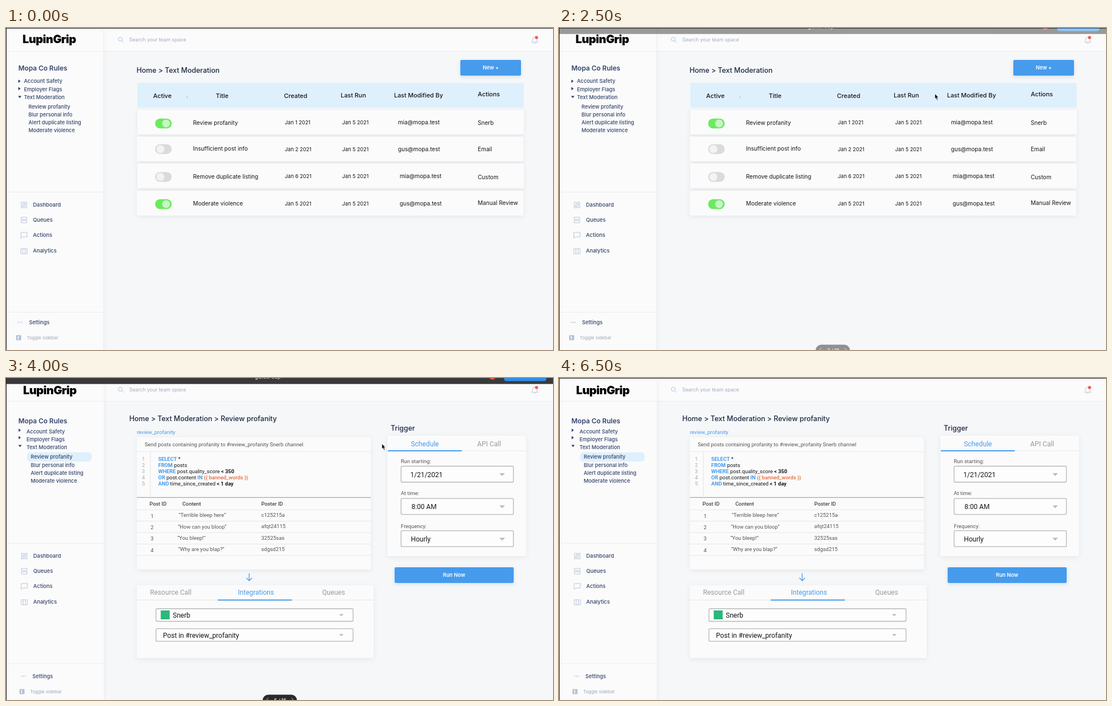
Recreate the animation shown at these times as an HTML page. Size 974 px wide and 575 px high, loop 6750 ms.

```html
<!DOCTYPE html>
<html lang="en">
<head>
<meta charset="utf-8">
<title>Rules console</title>
<style>
html, body { margin: 0; width: 100%; height: 100%; overflow: hidden; background: #f5f7f9; }
svg { display: block; width: 974px; height: 575px; }
text { font-family: Inter, sans-serif; white-space: pre; }
.r { font-family: Roboto, sans-serif; }
.card { fill: #fbfbfb; filter: drop-shadow(0 2px 4px rgba(40, 50, 70, .08)); }
.btn { fill: #469bec; filter: drop-shadow(0 2px 3px rgba(40, 90, 150, .16)); }
.icon { fill: none; stroke: #b9c5d8; stroke-width: 1; }
</style>
</head>
<body>
<svg id="stage" viewBox="0 0 974 575"></svg>
<script>
const NAVY = '#33446b', INK = '#15161a', BLUE = '#469bec', GREY = '#555';
const BRAND = 'LupinGrip', APP = 'Snerb';

// y is the middle of the line
const text = (x, y, s, size, fill = INK, weight = 400, cls = '') =>
  `<text x="${x}" y="${y + size * .36}" font-size="${size}" fill="${fill}" font-weight="${weight}" class="${cls}">${s}</text>`;
const roboto = (x, y, s, size = 9.45, fill = GREY, weight = 400) => text(x, y, s, size, fill, weight, 'r');
const rect = (x, y, w, h, fill, r = 0, more = '') =>
  `<rect x="${x}" y="${y}" width="${w}" height="${h}" rx="${r}" fill="${fill}" ${more}/>`;
const card = (x, y, w, h) => `<rect class="card" x="${x}" y="${y}" width="${w}" height="${h}" rx="1"/>`;
const path = (d, more = '') => `<path d="${d}" ${more}/>`;
const circle = (x, y, r, fill) => `<circle cx="${x}" cy="${y}" r="${r}" fill="${fill}"/>`;
const shift = (x, y, s) => `<g transform="translate(${x} ${y})">${s}</g>`;
const each = (list, fn) => list.map(fn).join('');
const button = (x, y, w, label, lx) =>
  `<rect class="btn" x="${x}" y="${y}" width="${w}" height="28" rx="2"/>` + text(lx, y + 13.7, label, 9.2, '#fff', 600);
const select = (x, y, w, h, value, vx, tx, half) =>
  rect(x, y, w, h, '#fdfdfd', 2, 'stroke="#b6b6b6" stroke-width="1.3"') +
  roboto(vx, y + h / 2 + .4, value, 12.1, INK) +
  path(`M${tx - half} ${y + h / 2 - 1.8}h${half * 2}l${-half} ${half}z`, 'fill="#bcbcbc"');

function sidebar(titleY, x, y, subX, arrowX, arrowY, editing) {
  const d = editing ? 2 : 0;
  const rule = y => rect(1, y, 172 + d / 2, 1, '#ececef');
  const nav = [['Dashboard', 315.5], ['Queues', 342.5], ['Actions', 369.7], ['Analytics', 398]];
  return `<rect class="card" x="1" y="1" width="${172 + d / 2}" height="574"/>` +
    rule(41) + rule(292.5 + d) + rule(507 + d * 1.3) +
    `<g letter-spacing="-.5">${text(29.5 + d / 2, 20.2 + d, BRAND, 20.2, '#000', 900)}</g>` +
    text(22, titleY, 'Mopa Co Rules', 12, NAVY, 600) +
    (editing ? rect(subX - 6.5, y + 37, 115, 16.5, '#def0fc', 6) : '') +
    each(['Account Safety', 'Employer Flags', 'Text Moderation'], (s, i) => text(x, y + i * 14.2, s, 9.3, NAVY, 500)) +
    each(['Review profanity', 'Blur personal info', 'Alert duplicate listing', 'Moderate violence'],
      (s, i) => text(subX, y + 45.3 + i * 14.2, s, 9.3, NAVY, 500)) +
    path(`M${arrowX} ${arrowY - 3}v6l4-3zm0 13.3v6l4-3zM${arrowX - .5} ${arrowY + 26.3}h6l-3 4z`, `fill="${NAVY}"`) +
    shift(d / 4, d, each(nav, ([s, y]) => text(48, y, s, 9.5, NAVY, 500)) +
      path('M27 311h4v5h-4zM33 311h4v3h-4zM33 316h4v5h-4zM27 318h4v3h-4z' +
        'M27 338h10v4h-10zM27 344h10v4h-10z' +
        'M26.500 365h11v8h-8l-3 2.500z' +
        'M26.500 394h11v9h-11zM30 394v9M34 394v9', 'class="icon"')) +
    shift(d * 3, d * 3.5, each([22, 25.3, 28.6], x => circle(x, 525.5, .9, '#b3bccb')) +
      text(41, 525.3, 'Settings', 9.3, NAVY, 500) +
      rect(18, 548.5, 9, 9, '#b4c1d6', 1) + rect(21, 550, 1.5, 6, '#fff') +
      text(37, 552.8, 'Toggle sidebar', 8, '#9ba7bb'));
}

const header = rect(174, 1, 800, 40, '#fbfbfb') + rect(174, 41, 800, 1, '#ecedf0') +
  path('M207 20a3.500 3.500 0 1 1-7 0a3.500 3.500 0 1 1 7 0M206 22.500l3.500 3.500', 'fill="none" stroke="#a7c4ee"') +
  text(219.5, 20.5, 'Search your team space', 8.8, '#a0abc0') +
  path('M936 25.500h11c-2-2-1.500-4-1.800-6c-.5-4.500-7-4.500-7.400 0c-.2 2 0 4-1.800 6M940 27.500h3', 'class="icon"') +
  circle(944.7, 17, 2.8, '#ef5b50');

function toggle(y, on) {
  return rect(265.5, y - 8.7, 29.5, 17.4, on ? '#6aeb5e' : '#dbdbdb', 8.7) +
    circle(on ? 285 : 275, y, 7, on ? '#c8f5c4' : '#f3f3f3');
}

function listPage() {
  const heads = [['Active', 262, 121], ['Title', 373.5, 121], ['Created', 495, 121],
    ['Last Run', 596, 120], ['Last Modified By', 691, 120], ['Actions', 840, 118]];
  const mia = 'mia@mopa.test', gus = 'gus@mopa.test';
  const rows = [
    [234, 146, 'Review profanity', 'Jan 1 2021', mia, 698, APP, 169, true],
    [233, 194, 'Insufficient post info', 'Jan 2 2021', gus, 698, 'Email', 216.7, false],
    [234, 242, 'Remove duplicate listing', 'Jan 6 2021', mia, 701, 'Custom', 266, false],
    [233, 291, 'Moderate violence', 'Jan 5 2021', gus, 701, 'Manual Review', 312.3, true]];
  return text(232.5, 75, 'Home &gt; Text Moderation', 12.5, '#1d2740', 500) +
    button(809, 57, 108, 'New +', 849) +
    rect(234, 98, 688, 44, '#def0fc', 1) +
    each(heads, ([s, x, y]) => text(x, y, s, 10.9, INK, 500)) + circle(322.5, 123.5, .7, '#667') +
    each(rows, ([x, y, title, made, by, byX, act, actY, on], i) => card(x, y, 688, 44) +
      toggle([170.5, 216.2, 266, 314.5][i], on) +
      text(333, [169.8, 215.5, 265.5, 313][i], title, 10.15) +
      text(496.5, y + 22.8, made, 9.2) + text(598.5, y + 22.8, 'Jan 5 2021', 9.2) +
      text(byX, y + 22.3, by, 10.15) + text(840, actY, act, 10.1));
}

function queryPanel() {
  const key = s => `<tspan fill="${BLUE}" font-weight="600">${s}</tspan>`;
  const bold = s => `<tspan font-weight="700">${s}</tspan>`;
  const code = [key('SELECT') + ' *', key('FROM') + ' posts',
    key('WHERE') + ' post.quality_score ' + bold('&lt; 350'),
    key('OR') + ' post.content ' + key('IN') + ' <tspan fill="#e8683a" font-weight="500">{{ banned_words }}</tspan>',
    key('AND') + ' time_since_created ' + bold('&lt; 1 day')];
  const posts = [['Terrible bleep here', 'c125215a', 299.5], ['How can you bloop', 'afqt24115', 298],
    ['You bleep!', '32525sas', 297], ['Why are you blap?', 'sdgsd215', 298.5]];
  return text(211.5, 72, 'Home &gt; Text Moderation &gt; Review profanity', 12.5, '#1d2740', 500) +
    roboto(225, 96.3, 'review_profanity', 9.45, BLUE) + card(225, 105, 416.5, 236) +
    roboto(239, 118, `Send posts containing profanity to #review_profanity ${APP} channel`) +
    rect(225, 130, 416.5, 1, '#e9e9ea') + rect(248.5, 131, 1, 78, '#e2e2e4') +
    each(code, (s, i) => roboto(234, 144.2 + i * 10.85, i + 1, 9.4, '#aaa') + roboto(263, 144.2 + i * 10.85, s, 9.4, INK)) +
    rect(225, 212, 416.5, 1, '#929292') +
    each([['Post ID', 247.5], ['Content', 306], ['Poster ID', 446.5]], ([s, x]) => roboto(x, 223.5, s, 9.4, '#444', 500)) +
    each(posts, ([s, id, x], i) => rect(225, 234 + i * 20.4, 416.5, 1, '#e6e6e7') +
      roboto(249.5, 245.5 + i * 20.3, i + 1) + roboto(x, 244.2 + i * 20.2, `“${s}”`) + roboto(446.5, 244 + i * 20.2, id)) +
    rect(225, 315.5, 416.5, 1, '#e6e6e7');
}

const arrow = x => path(`M${x} 349v13m-5-5l5 5l5-5`, `fill="none" stroke="${BLUE}" stroke-width="1.3"`);

const trigger = text(685, 89, 'Trigger', 12.5, '#1d2740', 500) + card(679, 103, 247, 215) +
  rect(679, 129.5, 247, 1, '#e6e6e8') + rect(680, 129, 131.5, 2, BLUE) +
  roboto(721, 117.8, 'Schedule', 12.2, BLUE) + roboto(839, 117.8, 'API Call', 12.2, '#9a9a9a') +
  each([['Run starting:', 148.3, '1/21/2021', 720], ['At time:', 206, '8:00 AM', 722], ['Frequency:', 265, 'Hourly', 721]],
    ([label, y, value, x], i) => roboto(703, y, label, 9.5) +
      select(703.5, 157.5 + i * 57.6, 200, 28.5, value, x, 883.5, 5)) +
  button(692, 338, 212, 'Run Now', 778);

const integrations = card(233, 370, 421.5, 130) +
  rect(233, 396, 421.5, 1, '#e6e6e8') + rect(377, 395.5, 132, 2, BLUE) +
  roboto(256.5, 383, 'Resource Call', 12.1, '#9a9a9a') + roboto(413, 383, 'Integrations', 12.1, BLUE) +
  roboto(563, 382.5, 'Queues', 12.1, '#9a9a9a') +
  select(267, 412, 351, 22.5, APP, 297, 597, 4) + rect(275.5, 415, 16, 16, '#2eb67d') +
  select(267, 447.7, 351, 22.5, 'Post in #review_profanity', 279.5, 597, 4);

const bars = rect(0, 0, 974, 10.7, '#3a3a3c') + circle(866, -3.5, 6.5, '#dd5646') +
  rect(887, -20, 75, 25.5, '#2f8fe8', 4) +
  text(443, -3, 'guide cap', 10, '#eee') +
  rect(457, 565.5, 61, 24, '#2b2b2c', 10) +
  path('M467 571.500l-3 3.500l3 3.500M508.500 571.500l3 3.500l-3 3.500', 'fill="none" stroke="#ddd"') +
  `<text id="page" x="477.5" y="578.5" font-size="8.5" font-weight="500" fill="#fff"></text>`;

const scenes = [
  header + sidebar(72, 32, 95, 40, 22, 95, false) + listPage(),
  header + sidebar(79.5, 36.5, 100.3, 44, 24, 99.7, true) + queryPanel() + arrow(426) +
    button(225, 371, 414, 'Add Action', 407) + trigger,
  header + sidebar(76.3, 36.5, 95.7, 44, 22.5, 93.3, true) + shift(8, .8, queryPanel()) + arrow(433) +
    integrations + trigger];

const stage = document.getElementById('stage');
stage.innerHTML = rect(0, 0, 974, 575, '#f5f7f9') + each(scenes, s => `<g class="scene">${s}</g>`) +
  rect(0, 0, 974, 1, '#1c1c1c') + `<g id="bars">${bars}</g>` + rect(0, 0, 1, 575, '#1c1c1c') +
  `<g id="cursor">${path('M.4.4v9.200l2-1.800l1.500 3.800l1.700-.7l-1.600-3.700h2.700z', 'fill="#000" stroke="#fff" stroke-width=".6"')}</g>`;

const groups = [...document.querySelectorAll('.scene')];
const overlay = document.getElementById('bars');
const page = document.getElementById('page');
const cursor = document.getElementById('cursor');
const show = (el, on) => { el.style.display = on ? '' : 'none'; };

function draw(now) {
  const t = now % 6750;
  const scene = t < 3000 ? 0 : t < 4000 ? 1 : 2;
  groups.forEach((g, i) => show(g, i === scene));
  overlay.setAttribute('opacity', t < 2500 ? 0 : t < 2750 ? .5 : t < 6250 ? 1 : t < 6500 ? .12 : 0);
  page.textContent = `${scene + 3} / 16`;
  show(cursor, t >= 1000 && t < 5500);
  cursor.setAttribute('transform', t < 1250 ? 'translate(714 -9)' : 'translate(669 117)');
}

const start = performance.now();
function tick() {
  draw(performance.now() - start);
  requestAnimationFrame(tick);
}
tick();
</script>
</body>
</html>
```
